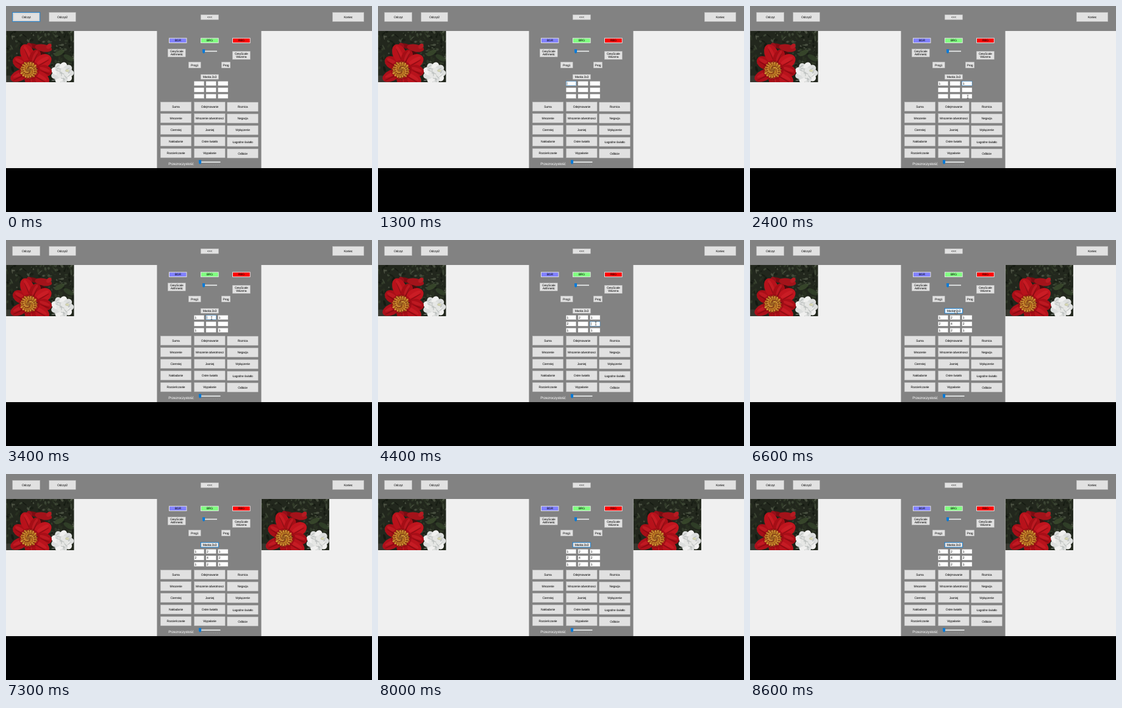
Animation of 600 by 338 pixels, one loop 8.7 s. Source, as an HTML page:

```html
<!DOCTYPE html>
<html lang="pl">
<head>
<meta charset="utf-8">
<style>
html, body { margin: 0; width: 100%; height: 100%; overflow: hidden; background: #000; }
svg { display: block; width: 100%; height: 100%; }
text { font: 5px "Liberation Sans", Arial, sans-serif; letter-spacing: -.2px; text-rendering: geometricPrecision; fill: #000; }
</style>
</head>
<body>
<svg id="stage" viewBox="0 0 600 338" preserveAspectRatio="none"></svg>
<script>
const LOOP = 8700, STEP = 100;
const BLUE = '#0078d7', EDGE = '#b4b4b4';
const stage = document.getElementById('stage');

function add(tag, attrs = {}, parent = stage) {
  const node = document.createElementNS('http://www.w3.org/2000/svg', tag);
  for (const key in attrs) node.setAttribute(key, attrs[key]);
  parent.appendChild(node);
  return node;
}
const box = (x, y, width, height, fill, parent) => add('rect', { x, y, width, height, fill }, parent);
function label(content, x, y, attrs = {}) {
  const node = add('text', { x, y, 'text-anchor': 'middle', ...attrs });
  node.textContent = content;
  return node;
}
function button(caption, x, y, w, h, fill = '#e1e1e1', edge = EDGE, line = .5) {
  const face = add('rect', {
    x: x + line / 2, y: y + line / 2, width: w - line, height: h - line,
    fill, stroke: edge, 'stroke-width': line
  });
  const rows = caption.split('\n');
  rows.forEach((row, i) => label(row, x + w / 2, y + h / 2 + 1.75 + (i - (rows.length - 1) / 2) * 5));
  return face;
}

// Window areas
box(0, 0, 600, 266, '#f0f0f0');
box(0, 0, 600, 41, '#828282');
box(247.5, 41, 171, 225, '#828282');

// Photo: softly blurred shapes
function seeded(seed) {
  return () => (seed = (seed * 16807) % 2147483647) / 2147483647;
}
const defs = add('defs');
const clip = add('clipPath', { id: 'frame' }, defs);
box(0, 0, 111, 84, '#000', clip);
const soften = add('filter', { id: 'soften', x: 0, y: 0, width: 1, height: 1 }, defs);
add('feGaussianBlur', { stdDeviation: .6 }, soften);
const photo = add('g', { id: 'photo', 'clip-path': 'url(#frame)' }, defs);
box(0, 0, 111, 84, '#22271d', photo);
const paint = add('g', { filter: 'url(#soften)' }, photo);
const blob = (cx, cy, rx, ry, turn, fill, opacity = 1) =>
  add('ellipse', { cx, cy, rx, ry, fill, opacity, transform: `rotate(${turn} ${cx} ${cy})` }, paint);

box(-2, -2, 115, 88, '#22271d', paint);
const rnd = seeded(77);
const greens = ['#39432f', '#161b12', '#4a5540', '#2c3524', '#10140d', '#5c6352'];
for (let i = 0; i < 190; i++) {
  blob(rnd() * 112, rnd() * 64, 1 + rnd() * 4, .7 + rnd() * 1.6, rnd() * 180, greens[Math.floor(rnd() * 6)], .65);
}
blob(4, 82, 16, 9, 0, '#3d3d35', .8);
blob(87, 36, 9, 4, -25, '#3c4c2e', .8);
blob(102, 44, 9, 4, 30, '#33432a', .8);
blob(74, 76, 9, 10, 0, '#1b2216');

// Back bloom
blob(46, 25, 11, 4, 15, '#7d0c12');
blob(61, 28, 14, 6, 10, '#a3131a');
blob(70, 25, 5, 3.5, -45, '#b51b22');
blob(38, 24, 5, 4, 40, '#96101a');
blob(56, 36, 9, 3, 15, '#4a0c0d');

// White bloom
for (let i = 0; i < 9; i++) {
  const a = i * 40 * Math.PI / 180;
  blob(92 + 10 * Math.cos(a), 69 + 9 * Math.sin(a), 9, 6.5, i * 40, i % 2 ? '#f0f0ef' : '#dcdedd');
}
blob(92, 69, 10, 9, 0, '#e6e7e5');
for (let i = 0; i < 14; i++) {
  blob(78 + rnd() * 28, 57 + rnd() * 24, 4, .8, rnd() * 180, '#aeb3b0', .6);
}
blob(100, 65, 3, 2, 0, '#d0cf96', .6);

// Red bloom
const petals = [
  [23, 52, 13, 10, 30, '#a80e17'], [35, 38, 17, 11, 65, '#b8121b'],
  [47, 43, 13, 9, -65, '#a50e16'], [60, 50, 15, 11, -30, '#c0151e'],
  [63, 65, 12, 9, 20, '#a80e17'], [22, 73, 16, 9, -25, '#ad101a'],
  [55, 76, 17, 10, 30, '#b8131c'], [39, 79, 12, 9, 80, '#a50e16']
];
for (const [x, y, rx, ry, turn, fill] of petals) {
  blob(x, y, rx, ry, turn, fill);
  blob(x, y - 2, rx * .75, ry * .3, turn, '#d8282e', .45);
  blob(x, y + 3, rx * .8, .9, turn, '#6c070d', .55);
}
blob(37.5, 64, 17, 16, 0, '#8f0b13', .6);
for (let i = 0; i < 100; i++) {
  const a = i * 2.4, r = 1.35 * Math.sqrt(i);
  const tone = ['#c08a28', '#a8641c', '#d2a038', '#8f4a18'][i % 4];
  blob(37 + r * Math.cos(a), 64 + r * Math.sin(a), 1.7, 1.2, a * 57.3, tone);
}
blob(36.5, 64, 4, 3.5, 0, '#8a5420', .6);

add('use', { href: '#photo', x: .4, y: 41 });
const result = add('use', { href: '#photo', x: 418.8, y: 41 });

// Controls
const load = button('Odczyt', 10.5, 10.3, 45.5, 15.5);
const loadDots = add('rect', { x: 12, y: 11.8, width: 42.5, height: 12.5, fill: 'none', stroke: '#555', 'stroke-width': .35, 'stroke-dasharray': '.5 .5' });
button('Odczyt2', 70.5, 10.3, 44, 15.5);
button('<<<', 319, 14, 29.7, 8.7);
button('Koniec', 535, 10.3, 52, 15.5);
button('BGR', 267, 52.4, 29.5, 8.5, '#8080ff', '#e1e1e1', 1);
button('BRG', 319, 52.4, 29.7, 8.5, '#80ff80', '#e1e1e1', 1);
button('RBG', 371, 52.4, 29.7, 8.5, '#ff0000', '#e1e1e1', 1);
button('GreyScale\nArithmetic', 265, 70.3, 29.5, 13.5);
button('GreyScale\nWazona', 371, 74, 29.5, 14);
button('Prog1', 299, 91.7, 20.5, 10.3);
button('Prog', 353, 91.7, 15, 10.3);
const mask = button('Maska 3x3', 319, 112, 29.7, 8.4);

const captions = [
  'Suma', 'Odejmowanie', 'Roznica',
  'Mnozenie', 'Mnozenie odwrotnosci', 'Negacja',
  'Ciemniej', 'Jasniej', 'Wyłączenie',
  'Nakladanie', 'Ostre światło', 'Łagodne światło',
  'Rozcieńczanie', 'Wypalanie', 'Odbicie'
];
captions.forEach((caption, i) => {
  const col = i % 3, row = Math.floor(i / 3);
  button(caption, [253, 308.4, 362.5][col], 157.3 + row * 19.1 + (col === 2 ? .4 : 0), 51, 15.5);
});

function slider(x, y, w) {
  box(x, y, w, 1.7, '#e7eaea');
  add('path', { d: `M${x + .1} ${y - 2.5}h4v5l-2 2l-2 -2z`, fill: BLUE });
}
slider(322, 73.4, 24);
slider(316, 255.3, 35.5);
for (let i = 0; i <= 10; i++) box(318.5 + i * 3.1, 260.6, .5, 1.1, '#a8a8a8');
label('Przezroczystość', 266.3, 261.2, { 'text-anchor': 'start', style: 'font-size:6.1px;fill:#fff' });

const fields = Array.from({ length: 9 }, (_, i) => {
  const x = 308.3 + (i % 3) * 19.6, y = 123.5 + Math.floor(i / 3) * 10.5;
  return {
    rect: add('rect', { x, y, width: 16.5, height: 7.2, fill: '#fff', 'stroke-width': .4 }),
    text: label('', x + 1.2, y + 5.4, { 'text-anchor': 'start' }),
    caret: box(x + 1.5, y + 1.2, .45, 5, '#000')
  };
});

const beam = add('path', { d: 'M-1.3 -2.7h1l.3 .4l.3 -.4h1M0 -2.3v4.6M-1.3 2.7h1l.3 -.4l.3 .4h1', fill: 'none', stroke: '#111', 'stroke-width': .55 });
const arrow = add('path', { d: 'M0 0v6.2l1.4 -1.3l1 2.3l1 -.4l-1 -2.2h2z', fill: '#fff', stroke: '#000', 'stroke-width': .45 });

// Field index, time focused, time typed, digit
const entries = [
  [0, 1100, 1500, '1'], [2, 2100, 2200, '1'], [8, 2600, 2800, '1'],
  [6, 3000, 3200, '1'], [1, 3400, 3500, '2'], [3, 3800, 3900, '2'],
  [5, 4300, 4600, '2'], [7, 4900, 5000, '2'], [4, 5300, 5500, '4']
];
const MASK_FOCUS = 6100, RESULT = 6500;
// Pointer: time, x, y
const moves = [
  [1700, 322, 128], [2000, 357, 128], [2200, 357, 128], [2400, 357, 149], [2800, 357, 149],
  [3000, 317, 149], [3200, 317, 149], [3400, 337, 128], [3500, 337, 128], [3800, 318, 138],
  [4000, 318, 138], [4200, 357, 137], [4600, 357, 137], [4900, 337, 149], [5000, 337, 149],
  [5300, 337, 138], [5600, 337, 138], [5900, 336, 115], [7200, 336, 115]
];

function pointerAt(t) {
  const next = moves.findIndex(move => move[0] > t);
  if (next < 1) return null;
  const [t0, x0, y0] = moves[next - 1], [t1, x1, y1] = moves[next];
  const p = (t - t0) / (t1 - t0), ease = p * p * (3 - 2 * p);
  return [x0 + (x1 - x0) * ease, y0 + (y1 - y0) * ease];
}
const show = (node, on) => node.setAttribute('visibility', on ? 'visible' : 'hidden');
function outline(node, on) {
  node.setAttribute('stroke', on ? BLUE : EDGE);
  node.setAttribute('stroke-width', on ? .8 : .5);
}

function draw(t) {
  const active = t < MASK_FOCUS ? entries.filter(entry => entry[1] <= t).pop() : null;
  for (const [index, , typed, digit] of entries) {
    const field = fields[index], focused = active && active[0] === index;
    field.text.textContent = t >= typed ? digit : '';
    field.rect.setAttribute('stroke', focused ? BLUE : '#a0a0a0');
    show(field.caret, focused && t < typed);
  }
  outline(load, t < entries[0][1]);
  show(loadDots, t < entries[0][1]);

  const pointer = pointerAt(t);
  const hover = pointer && pointer[1] < 120;
  outline(mask, hover || t >= MASK_FOCUS);
  mask.setAttribute('fill', hover ? '#e5f1fb' : '#e1e1e1');
  show(result, t >= RESULT);
  show(beam, pointer && !hover);
  show(arrow, hover);
  if (pointer) (hover ? arrow : beam).setAttribute('transform', `translate(${pointer})`);
}

const start = performance.now();
function tick() {
  const t = (performance.now() - start) % LOOP;
  draw(Math.floor(t / STEP) * STEP);
  requestAnimationFrame(tick);
}
tick();
</script>
</body>
</html>
```
